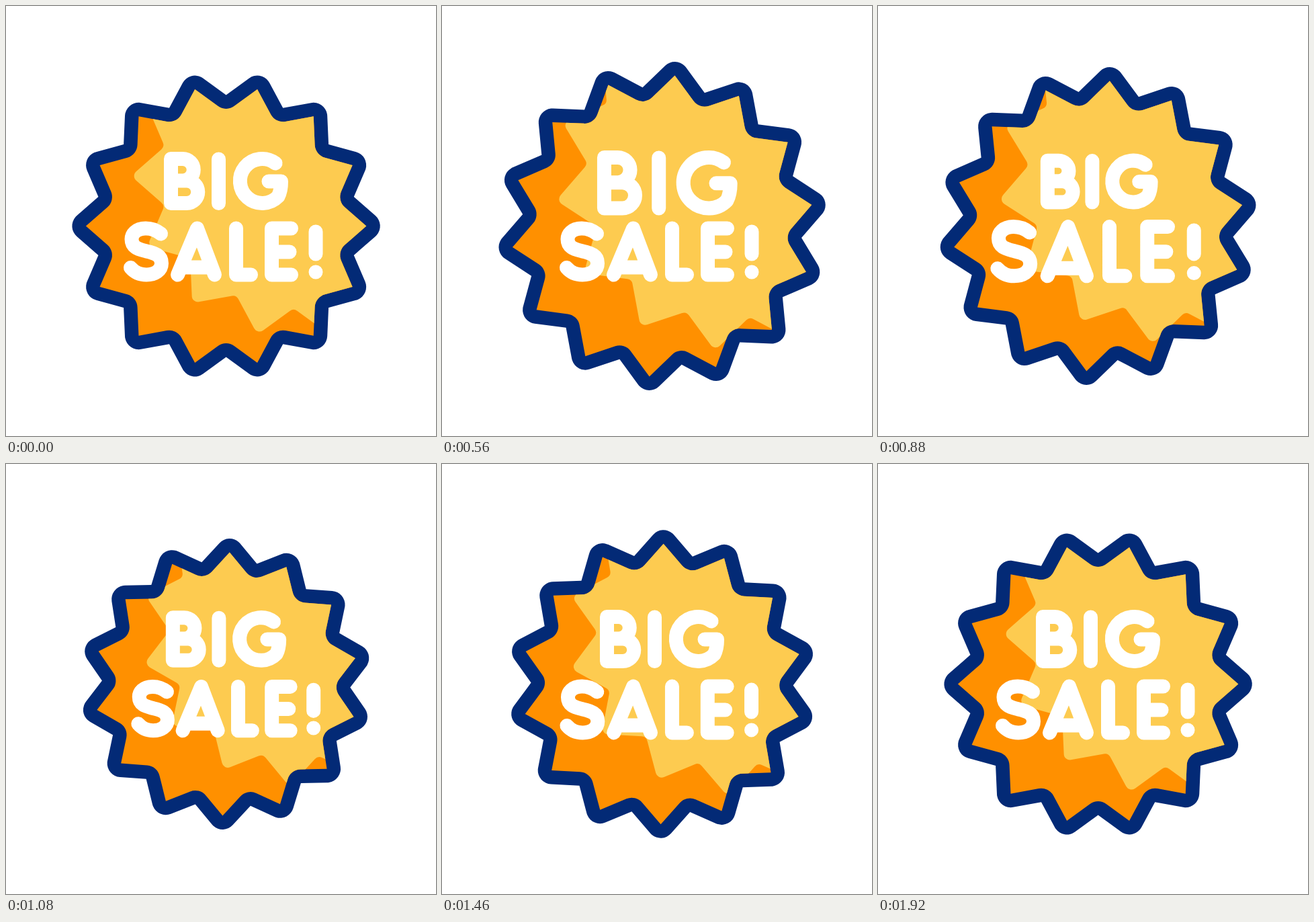
An HTML page with a canvas that plays this animation: 640x640 px, repeating every 2 s.

```html
<!DOCTYPE html>
<html lang="en">
<head>
<meta charset="utf-8">
<title>Big sale</title>
<style>
html, body { margin: 0; width: 100%; height: 100%; overflow: hidden; background: #fff; }
canvas { display: block; width: 640px; height: 640px; }
</style>
</head>
<body>
<canvas id="stage" width="640" height="640" role="img" aria-label="BIG SALE!"></canvas>
<script>
const ctx = document.getElementById('stage').getContext('2d');
const LOOP = 2000, POINTS = 14, RIM = 20.5, PEN = 21;
const BLUE = '#032a76', ORANGE = '#ff9000', YELLOW = '#fdcb50';

// Rounded lettering as centre lines
const BIG = new Path2D(
  'M245.5 227.5H263a16.25 16.25 0 0 1 0 32.5H269a16.75 16.75 0 0 1 0 33.5H245.5ZM245.5 260H264' +
  'M316.5 228V293.5' +
  'M401 234A33 33 0 1 0 405 283.5Q409.5 275 409.5 261H391');
const SALE = new Path2D(
  'M230.5 339C223 333 215 331 208 331C193 331 187 340 187 347C187 360 198 362 209 365' +
  'C222 368 231.5 371 231.5 383C231.5 394 221 400 209 400C198 400 191 396 185.5 389.5' +
  'M255.5 400L284.5 331L310.5 400M261 389H306' +
  'M342.5 331V400H364.5' +
  'M424.5 331H395.5V400H424.5M395.5 366H422' +
  'M461 336V369M461 396h.01');

// Smooth interpolation through [time, value] keys
function track(keys, t) {
  if (t <= keys[0][0]) return keys[0][1];
  for (let i = 1; i < keys.length; i++) {
    const [t0, a] = keys[i - 1], [t1, b] = keys[i];
    if (t < t1) {
      const u = (t - t0) / (t1 - t0);
      return a + (b - a) * u * u * (3 - 2 * u);
    }
  }
  return keys[keys.length - 1][1];
}

// cubic-bezier(x1, 0, x2, 1)
function ease(x, x1, x2) {
  if (x <= 0 || x >= 1) return x <= 0 ? 0 : 1;
  let lo = 0, hi = 1, p;
  for (let i = 0; i < 30; i++) {
    p = (lo + hi) / 2;
    const q = 1 - p;
    if (3 * q * q * p * x1 + 3 * q * p * p * x2 + p * p * p < x) lo = p; else hi = p;
  }
  return p * p * (3 - 2 * p);
}

function star(cx, cy, outer, inner, angle, tipRound, dipRound) {
  const path = new Path2D();
  const at = i => {
    const r = i % 2 ? inner : outer, a = angle + i * Math.PI / POINTS;
    return [cx + r * Math.cos(a), cy + r * Math.sin(a)];
  };
  const [x0, y0] = at(0), [x1, y1] = at(1);
  path.moveTo((x0 + x1) / 2, (y0 + y1) / 2);
  for (let i = 1; i <= 2 * POINTS; i++) {
    path.arcTo(...at(i), ...at(i + 1), i % 2 ? dipRound : tipRound);
  }
  path.closePath();
  return path;
}

function line(path, cx, cy, scale, dx, dy) {
  ctx.save();
  ctx.translate(cx + dx, cy + dy);
  ctx.scale(scale, scale);
  ctx.translate(-cx, -cy);
  ctx.lineWidth = PEN / scale;
  ctx.strokeStyle = '#fff';
  ctx.stroke(path);
  ctx.restore();
}

function draw(t) {
  const angle = Math.PI * ease((t - 80) / 1820, 0.589, 0.377);
  const s = track([[420, 1], [720, 1.17], [1020, 0.932], [1320, 1]], t);
  const badge = star(327.6, 327.5, 208.7 * s, 169.7 * s, angle, 0, RIM);
  const shine = star(428, 253, 242 * s, 196.8 * s, angle, 9, 9);

  ctx.fillStyle = '#fff';
  ctx.fillRect(0, 0, 640, 640);
  ctx.lineJoin = ctx.lineCap = 'round';
  ctx.lineWidth = 2 * RIM;
  ctx.strokeStyle = BLUE;
  ctx.stroke(badge);
  ctx.fillStyle = ORANGE;
  ctx.fill(badge);
  ctx.save();
  ctx.clip(badge);
  ctx.fillStyle = YELLOW;
  ctx.fill(shine);
  ctx.restore();

  const bigScale = track([[180, 1], [480, 1.165], [930, 0.93], [1230, 1]], t);
  const bigShift = track([[180, 0], [600, 8], [1000, 0]], t);
  line(BIG, 327.5, 260.5, bigScale, bigShift, bigShift * 0.35);

  const saleScale = track([[600, 1], [800, 1.08], [1180, 0.92], [1500, 1]], t);
  const saleShift = track([[800, 0], [1080, 4], [1400, 0]], t);
  line(SALE, 323.5, 365.5, saleScale, saleShift, -saleShift * 0.35);
}

const start = performance.now();
function tick() {
  draw((performance.now() - start) % LOOP);
  requestAnimationFrame(tick);
}
tick();
</script>
</body>
</html>
```
